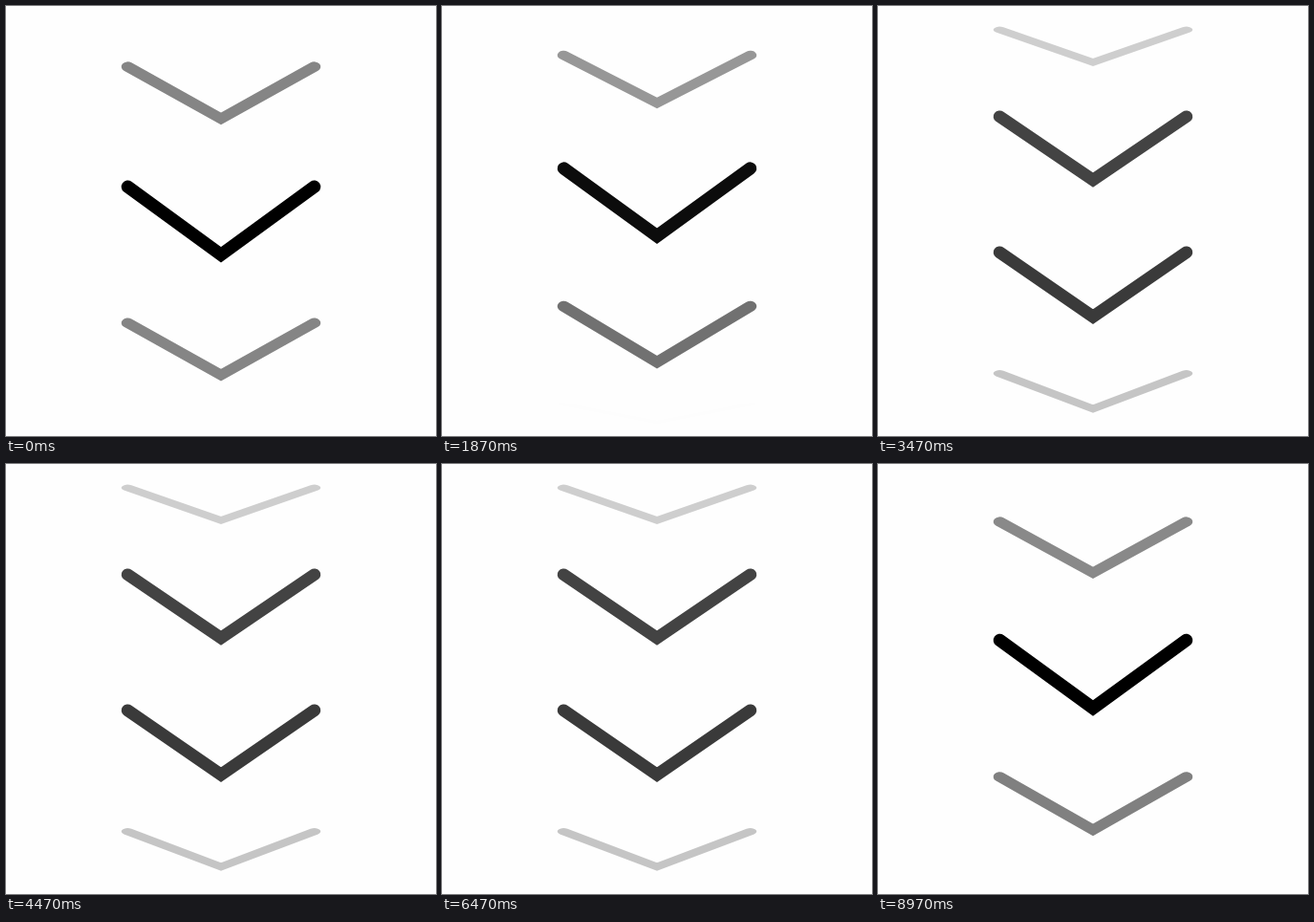
An HTML page that plays this animation: 450x450 px, repeating every 9.01 s.

```html
<!DOCTYPE html>
<html lang="en">
<head>
<meta charset="utf-8">
<title>Rolling chevrons</title>
<style>
  html, body { margin: 0; width: 100%; height: 100%; overflow: hidden; background: #fefefe; }
  svg { display: block; width: 100%; height: 100%; }
  path { fill: none; stroke: #000; stroke-width: 13.4; stroke-linecap: round; stroke-linejoin: miter; }
</style>
</head>
<body>
<svg id="stage" viewBox="0 0 450 450"></svg>
<script>
  const LOOP = 9010, FRAMES = 270, FRAME_MS = 100 / 3, CYCLE_FRAMES = 30;
  const CENTER = 225, RADIUS = 208.6, SPACING = 40;

  const stage = document.getElementById("stage");
  const chevrons = Array.from({ length: 4 }, () => {
    const path = document.createElementNS("http://www.w3.org/2000/svg", "path");
    path.setAttribute("d", "M-97.6 -35.8 L0 35.3 L97.6 -35.8");
    return stage.appendChild(path);
  });

  const clamp = (v) => Math.min(1, Math.max(0, v));

  // Chevrons sit on a turning cylinder, seen from the side without perspective.
  function draw(ms) {
    const frame = Math.min(FRAMES - 1, Math.floor((ms % LOOP + 3.4) / FRAME_MS));
    const phase = (frame % CYCLE_FRAMES) / CYCLE_FRAMES;
    chevrons.forEach((path, i) => {
      const degrees = (i + phase - 2) * SPACING;
      const angle = degrees * Math.PI / 180;
      const y = CENTER + RADIUS * Math.sin(angle);
      path.setAttribute("transform", `translate(${CENTER} ${y}) scale(1 ${Math.cos(angle)})`);
      // Solid facing front, gone at 75 degrees.
      path.setAttribute("opacity", clamp((75 - Math.abs(degrees)) / 73));
    });
  }

  const start = performance.now();
  function tick() {
    draw(performance.now() - start);
    requestAnimationFrame(tick);
  }
  tick();
</script>
</body>
</html>
```
